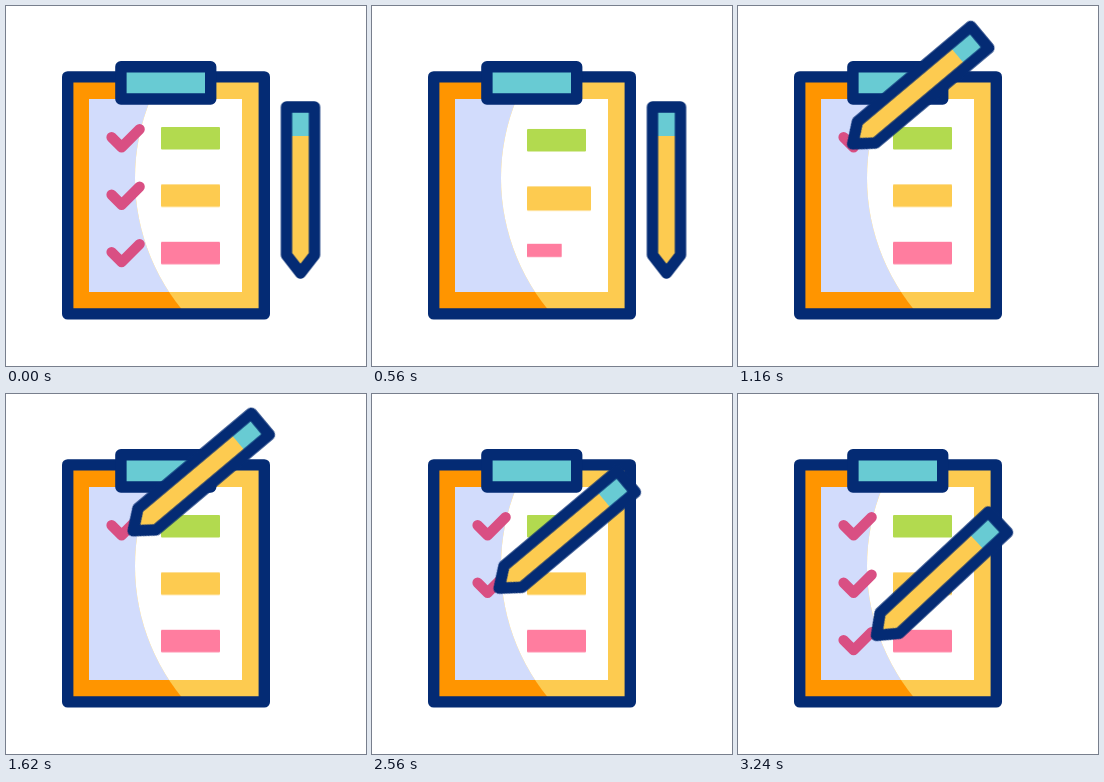
Recreate the animation shown at these times as an HTML page. Size 360x360 px, loop 3260 ms.

```html
<!DOCTYPE html>
<html lang="en">
<head>
<meta charset="utf-8">
<title>Checklist</title>
<style>
  html, body { margin: 0; width: 100%; height: 100%; overflow: hidden; background: #fff; }
  svg { display: block; width: 100vw; height: 100vh; }
  .line { fill: none; stroke: #042b74; stroke-width: 11.4; stroke-linejoin: round; }
  .check { fill: none; stroke: #d94f83; stroke-width: 10.4; stroke-linecap: round; stroke-linejoin: round; stroke-dasharray: 1 2; }
</style>
</head>
<body>
<svg viewBox="0 0 360 360">
  <defs>
    <clipPath id="lit"><circle cx="337" cy="172" r="208"/></clipPath>
  </defs>

  <rect x="62" y="71" width="196" height="237" fill="#ff9500"/>
  <rect x="83" y="93" width="153" height="193" fill="#d2dcfc"/>
  <g clip-path="url(#lit)">
    <rect x="62" y="71" width="196" height="237" fill="#fdcb50"/>
    <rect x="83" y="93" width="153" height="193" fill="#fff"/>
  </g>
  <rect class="line" x="61.7" y="70.9" width="196.6" height="237"/>

  <g id="bars"></g>
  <g id="checks"></g>

  <rect class="line" x="114.9" y="60.8" width="89.8" height="32.2" style="fill:#68cbd3"/>

  <g id="pencil">
    <path d="M-14-166H14V-18L0 0L-14-18Z" fill="#fdcb50"/>
    <path d="M-14-166H14V-137H-14Z" fill="#68cbd3"/>
    <path class="line" d="M-14-166H14V-18L0 0L-14-18Z"/>
  </g>
</svg>
<script>
  const LOOP = 3260, GAP = 57.4;
  const colors = ['#b2da4f', '#fdcb50', '#ff7d9f'];

  function add(parent, tag, attrs) {
    const el = document.createElementNS('http://www.w3.org/2000/svg', tag);
    for (const k in attrs) el.setAttribute(k, attrs[k]);
    return document.getElementById(parent).appendChild(el);
  }

  // Each step is [ms, value, easing towards the next step].
  function play(el, prop, steps) {
    const frames = steps.map(([ms, value, easing = 'linear']) =>
      ({ offset: ms / LOOP, [prop]: value, easing }));
    frames.push({ ...frames[frames.length - 1], offset: 1 });
    el.animate(frames, { duration: LOOP, iterations: Infinity });
  }

  // Bars collapse, then spring open one after another.
  colors.forEach((fill, i) => {
    const bar = add('bars', 'rect', { width: 59, height: 22.4, rx: 1, fill });
    const pose = (s, dy = 0) => `translate(155px, ${121 + i * GAP + dy}px) scale(${s})`;
    const t = 290 + i * 100;
    play(bar, 'transform', [
      [0, pose(1)], [10, pose(1), 'ease-in'],
      [200, pose(0, 2)],
      [t, pose(0, 2)], [t + 70, pose(.58, 2), 'ease-out'],
      [t + 170, pose(1.085, 2), 'ease-in-out'],
      [t + 270, pose(1, i ? 1 : 2), 'ease-out'],
      [t + 400, pose(1)]
    ]);
  });

  // Times at which the pencil touches down, turns and finishes each tick.
  const strokes = [[1080, 1160, 1400], [1970, 2040, 2340], [2880, 2950, 3240]];
  const rest = 'translate(294.5px, 267px) rotate(0deg)';
  const moves = [[0, rest], [565, rest, 'ease-in-out']];

  strokes.forEach(([down, turn, end], i) => {
    const y = i * GAP;
    const check = add('checks', 'path', {
      class: 'check', pathLength: 1,
      d: `M105.6 ${131.3 + y}l10 10l18-18`
    });
    play(check, 'strokeDashoffset', [
      [0, 0], [10, 0, 'ease-in'], [220, 1.3],
      [down - 20, 1.3], [down, 1], [turn, .64, 'ease-out'], [end, 0]
    ]);

    const at = (px, py, a) => `translate(${px}px, ${py + y}px) rotate(${a}deg)`;
    moves.push(
      [down, at(105.5, 128.5, 50)],
      [turn, at(114.5, 138, 50), 'ease-out'],
      [end, at(138.5, 126.6, 47)]
    );
    if (i < 2) moves.push(
      [end + 135, at(138.5, 126.6, 47), 'ease-in'],
      [end + 220, at(127.3, 136.5, 50), 'ease-out']
    );
  });
  play(document.getElementById('pencil'), 'transform', moves);
</script>
</body>
</html>
```
